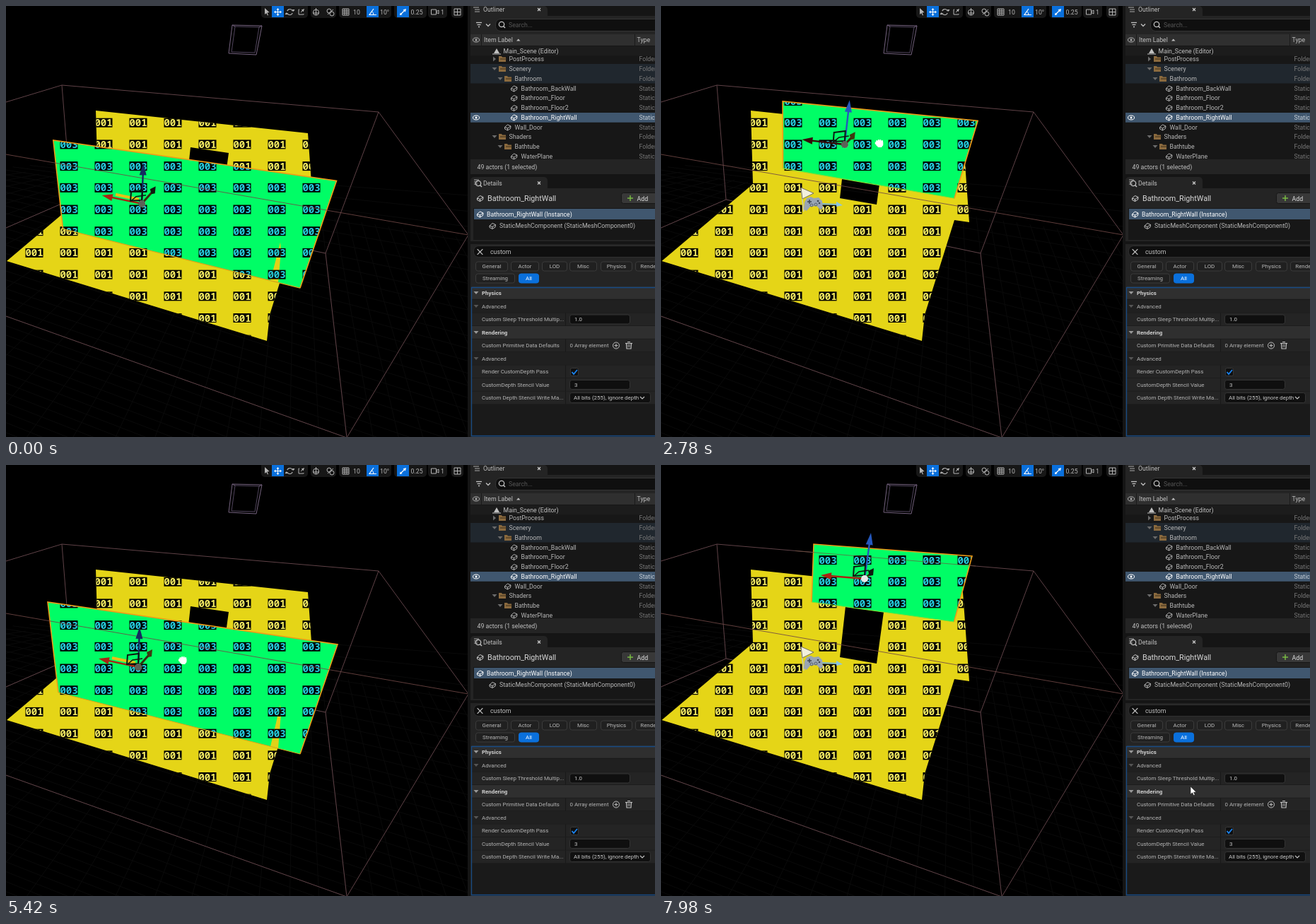
Recreate the animation shown at these times as an HTML page with a canvas. Size 918 by 610 pixels, loop 8000 ms.

```html
<!DOCTYPE html>
<html>
<head>
<meta charset="utf-8">
<style>
html, body { margin: 0; width: 100%; height: 100%; overflow: hidden; background: #000; }
canvas { display: block; }
</style>
</head>
<body>
<canvas id="stage" width="918" height="610"></canvas>
<script>
const g = document.getElementById('stage').getContext('2d');
const LOOP = 8000;

// [time, wall position along its drag axis]
const WALL = [[0, .05], [1460, .05], [1810, .178], [2230, .36], [2780, .72], [3060, .82], [3700, .99],
  [4300, .99], [4580, .809], [5070, .44], [5420, 0], [5560, -.01], [5760, -.01], [6150, .4],
  [6530, .8], [6740, .854], [7370, 1], [LOOP, 1]];
// [time, hand offset from the gizmo]
const HAND = [[1210, 22, -20], [1810, 23, -13], [2780, 49, -2], [4580, 55, -1], [5420, 63, -10], [6740, 60, 0], [7440, 62, 2]];
const ARROW_IN = [[70, 628, 468], [540, 201, 254], [800, 201, 254], [1000, 214, 255], [1210, 214, 255]];
const ARROW_OUT = [[7440, 350, 163], [7980, 749, 455], [LOOP, 749, 455]];

const mix = (a, b, k) => a + (b - a) * k;

function keyed(keys, t) {
  let i = 1;
  while (i < keys.length - 1 && keys[i][0] < t) i++;
  const a = keys[i - 1], b = keys[i];
  const k = Math.min(1, Math.max(0, (t - a[0]) / (b[0] - a[0])));
  return a.slice(1).map((v, j) => mix(v, b[j + 1], k));
}

function trace(pts, close = true) {
  pts.forEach(([x, y], i) => i ? g.lineTo(x, y) : g.moveTo(x, y));
  if (close) g.closePath();
}
function poly(pts, fill) {
  g.beginPath(); trace(pts); g.fillStyle = fill; g.fill();
}
function line(pts, color, w = 1, close = false) {
  g.beginPath(); trace(pts, close); g.strokeStyle = color; g.lineWidth = w; g.stroke();
}
function rect(x, y, w, h, fill, r = 0, border) {
  g.beginPath(); g.roundRect(x, y, w, h, r);
  g.fillStyle = fill; g.fill();
  if (border) { g.strokeStyle = border; g.lineWidth = 1; g.stroke(); }
}
function ring(x, y, r, color, w = 1, from = 0, to = 7) {
  g.beginPath(); g.arc(x, y, r, from, to); g.strokeStyle = color; g.lineWidth = w; g.stroke();
}
function dot(x, y, r, color) {
  g.beginPath(); g.arc(x, y, r, 0, 7); g.fillStyle = color; g.fill();
}
function text(s, x, y, color = '#c0c0c0', size = 8.75, weight = 400, font = 'Roboto, sans-serif') {
  g.font = `${weight} ${size}px ${font}`;
  g.fillStyle = color; g.textBaseline = 'alphabetic';
  g.fillText(s, x, y + size * .36);
}

// Fills the shapes and prints the stencil number over them on a screen grid
function stencil(shapes, fill, label, color) {
  g.save();
  g.beginPath(); shapes.forEach(s => trace(s));
  g.fillStyle = fill; g.fill('evenodd'); g.clip('evenodd');
  for (let r = 0; r < 12; r++) for (let c = 0; c < 9; c++) {
    const x = 40 + c * 49, y = 134.5 + r * 30.7;
    g.fillStyle = '#000'; g.fillRect(x - 12.5, y - 6.5, 25, 13);
    text(label, x - 12.6, y, color, 14, 700, '"Noto Sans Mono", monospace');
  }
  g.restore();
}

const ROOM = '#5f4247';
const FLOOR = [[127, 148], [427, 180], [436, 306], [415, 303], [373, 437], [369, 474], [1, 361], [130, 252]];
const DOOR = [[261, 200], [315, 208], [305, 281], [253, 272]];

function floorPoint(a, b) {
  return [mix(mix(92, 452, a), mix(-158, 482, a), b), mix(mix(274, 350, a), mix(383, 611, a), b)];
}

function backdrop() {
  for (let i = -6; i < 34; i++) {
    line([floorPoint(i / 16, -.2), floorPoint(i / 16, 2)], '#0a0a0a');
    line([floorPoint(-.5, i / 16), floorPoint(2, i / 16)], '#0a0a0a');
  }
  line([[0, 136], [79, 112], [92, 274], [0, 314]], ROOM);
  line([[92, 274], [452, 350], [482, 611], [0, 439]], ROOM);
  line([[527, 150], [452, 350]], ROOM);
  line([[79, 112], [527, 150], [654, 324], [482, 611]], ROOM);
  line([[320, 27], [362, 28], [354, 69], [315, 67]], '#75637f', 1, true);
  line([[324, 29], [358, 30], [352, 66], [319, 65]], '#51455d', 1, true);
  line([[320, 27], [324, 29]], '#75637f');
  line([[362, 28], [358, 30]], '#75637f');
}

function playerStart() {
  line([[198, 258], [202, 291]], '#c8c8c0', 1.5);
  poly([[198, 257], [216, 265], [200, 273]], '#f2f0dc');
  line([[198, 257], [216, 265], [200, 273]], '#77735a', 1, true);
  line([[228, 280], [250, 281]], '#7fb7d0', 2);
  poly([[248, 277], [257, 282], [248, 284]], '#8ec6de');
  poly([[206, 272], [212, 270], [216, 272], [223, 271], [228, 276], [229, 286], [225, 288], [220, 283],
    [211, 284], [206, 290], [202, 288], [203, 278]], '#9aa5b4');
  line([[207, 277], [213, 277]], '#3c4654', 1.5);
  line([[210, 274], [210, 280]], '#3c4654', 1.5);
  dot(222, 276, 1.3, '#3c4654'); dot(224, 279, 1.3, '#3c4654');
  ring(213, 282, 2, '#55606e'); ring(219, 281, 2, '#55606e');
}

function wall(u) {
  const bow = u * (1 - u);
  const tl = [mix(59, 216, u), mix(194, 112, u)];
  const tr = [mix(469, 440, u), mix(254, 129, u) - 8 * bow];
  const br = [mix(416, 414.5, u), mix(409, 222, u) - 10 * bow];
  const bl = [mix(74, 213, u) - 8 * bow, mix(322, 194, u)];
  const shape = [tl, tr, br, bl];
  stencil([shape], '#00fd66', '003', '#25cfe0');
  const edge = x => mix(bl[1], br[1], (x - bl[0]) / (br[0] - bl[0]));
  if (u < .5) {
    const top = br[1] / 2 + 135;
    const sliver = [[388, top], [389, top + 12], [385, edge(385)], [374, edge(374)]];
    stencil([sliver], '#e0d218', '003', '#25cfe0');
  }
  line([bl, tl, tr, br], '#ee9c18', 1.6);
  line([bl, br], u < .5 ? '#d9a817' : '#8ade30', 1.2);
}

function tip(x, y, dx, dy, len, w, color) {
  const d = Math.hypot(dx, dy), ux = dx / d, uy = dy / d;
  const bx = x - ux * len, by = y - uy * len;
  poly([[x, y], [bx - uy * w, by + ux * w], [bx + uy * w, by - ux * w]], color);
}

function gizmo(u, t) {
  const x = mix(187, 288, u), y = mix(286, 161, u);
  const drag = t > 1210 && t < 7440, far = drag && u > .5;
  const axis = (dx, dy, color, len, w) => {
    line([[x, y], [x + dx * .8, y + dy * .8]], color, 2.4);
    tip(x + dx, y + dy, dx, dy, len, w, color);
  };
  if (u < .5) line([[x - 37, y - 13], [x - 4, y - 6]], '#e8bf18', 4);
  axis(mix(-56, -62, u), mix(-12, -5, u), far ? '#360b0a' : '#a92413', 15, 5);
  axis(mix(2, 9, u), mix(-57, -65, u), u < .1 ? '#152b60' : u < .5 ? '#14285c' : '#2558bd', 17, 5);
  line([[x, y], [x + mix(15, 9, u), y + mix(-17, -8, u)]], '#342e10', 3);
  const ex = x + mix(16, 9, u), ey = y + mix(-19, -9, u);
  poly([[ex - 4, ey - 2], [ex + 4, ey - 6], [ex + 3, ey + 4], [ex - 2, ey + 5]], drag ? '#3e3a10' : '#10180f');
  line([[x - 15, y - 17], [x + 1, y - 19], [x, y - 5], [x - 16, y - 4]], '#0b1a12', 2, true);
  line([[x - 15, y - 4], [x - 8, y - 10], [x + 6, y - 12]], '#10180f', 1.6);
  dot(x, y, 5, t > 7440 ? '#e8e8e8' : '#454b42');
  for (let i = -4; i < 5; i += 2) for (let j = -4; j < 5; j += 2)
    if (i * i + j * j < 22 && t < 7440) { g.fillStyle = '#a0a498'; g.fillRect(x + i, y + j, 1, 1); }
  return [x, y];
}

function arrow([x, y]) {
  const pts = [[0, 0], [0, 11], [2.6, 8.8], [4.4, 12.6], [6.2, 11.8], [4.5, 8.2], [8, 8]].map(p => [x + p[0], y + p[1]]);
  poly(pts, '#fff'); line(pts, '#222', .6, true);
}

function hand(x, y) {
  rect(x - 4.5, y - 3, 10, 7.5, '#fff', 2.5);
  for (let i = 0; i < 4; i++) rect(x - 4.5 + i * 2.5, y - 5 + (i === 0 || i === 3), 2.2, 6, '#fff', 1);
  rect(x - 6, y - 2, 3.5, 4, '#fff', 1.5);
  rect(x - 2.5, y + 2, 6.5, 4, '#fff', 1.5);
}

function cursor(t, [x, y]) {
  if (t < 70) return;
  if (t < 1210) arrow(keyed(ARROW_IN, t));
  else if (t < 7440) { const [dx, dy] = keyed(HAND, t); hand(x + dx, y + dy); }
  else arrow(keyed(ARROW_OUT, t));
}

function toolbar() {
  const ink = '#b5b5b5';
  [[361, 66], [431, 36], [471, 74], [549, 46], [597, 27], [630, 17]].forEach(([x, w]) => rect(x, -6, w, 23, '#171717', 5));
  [376, 510, 553].forEach(x => rect(x, 0, 17, 16, '#0a70dc'));
  poly([[366, 3], [366, 12], [368.2, 10], [370, 13.5], [371, 13], [369.5, 9.5], [372.5, 9]], ink);
  line([[380, 8.5], [389, 8.5]], '#fff'); line([[384.5, 4], [384.5, 13]], '#fff');
  [[0, -1], [1, 0], [0, 1], [-1, 0]].forEach(([a, b]) => tip(384.5 + a * 5.5, 8.5 + b * 5.5, a, b, 2.5, 2, '#fff'));
  ring(401.5, 8.5, 4, ink, 1.2, .4, 2.8); ring(401.5, 8.5, 4, ink, 1.2, 3.5, 6);
  tip(406.5, 8, 0, 1, 3, 2, ink); tip(396.5, 9, 0, -1, 3, 2, ink);
  line([[415, 5], [414, 5], [414, 12], [421, 12], [421, 11]], ink);
  line([[417, 9], [421, 5]], ink); tip(422, 4, 1, -1, 4, 2, ink);
  ring(438.5, 9, 4, ink); line([[438.5, 3], [438.5, 13]], ink); line([[434, 10], [443, 10]], ink);
  ring(457, 7, 3, ink); ring(461, 11, 3, ink); line([[455, 12], [463, 5]], ink);
  for (let i = 0; i < 4; i++) {
    line([[476 + i * 3, 4], [476 + i * 3, 13]], ink);
    line([[476, 4 + i * 3], [485, 4 + i * 3]], ink);
  }
  text('10', 491, 8.5, ink);
  line([[520, 4], [514, 12.5], [524, 12.5]], '#fff', 1.2); ring(514, 12.5, 6, '#fff', 1, -1, 0);
  text('10°', 529, 8.5, ink);
  line([[558, 12], [564, 6]], '#fff', 1.2); tip(566, 4, 1, -1, 4, 2.4, '#fff'); tip(557, 13, -1, 1, 3, 2, '#fff');
  text('0.25', 572.5, 8.5, ink);
  line([[601.5, 5], [608.5, 5], [608.5, 12], [601.5, 12]], ink, 1, true);
  line([[608.5, 8], [612, 6], [612, 11], [608.5, 9]], ink);
  text('1', 615, 8.5, ink);
  line([[634, 4], [643, 4], [643, 13], [634, 13]], ink, 1, true);
  line([[638.5, 4], [638.5, 13]], ink); line([[634, 8.5], [643, 8.5]], ink);
}

function eye(x, y, color) {
  g.beginPath(); g.ellipse(x, y, 4.5, 3, 0, 0, 7); g.strokeStyle = color; g.lineWidth = 1; g.stroke();
  dot(x, y, 1.5, color);
}
function mesh(x, y, color = '#b8b8b8') {
  line([[x - 4, y], [x, y - 3.5], [x + 4.5, y - 1.5], [x + 4, y + 2], [x, y + 4.5], [x - 4, y + 2.5]], color, 1, true);
  line([[x - 4, y], [x, y + 1.5], [x + 4.5, y - 1.5]], color);
  line([[x, y + 1.5], [x, y + 4.5]], color);
}
function folder(x, y) {
  poly([[x - 5, y - 4], [x - 1, y - 4], [x, y - 2.5], [x + 5, y - 2.5], [x + 5, y + 4], [x - 5, y + 4]], '#8b6a3e');
  line([[x - 3, y], [x + 6, y]], '#3a2c18');
}
function fold(x, y, color = '#8a8a8a') { poly([[x - 3.5, y - 2], [x + 3.5, y - 2], [x, y + 2]], color); }
function lens(x, y) { ring(x, y, 3.7, '#c0c0c0', 1.3); line([[x + 2.5, y + 2.5], [x + 5, y + 5]], '#c0c0c0', 1.5); }
function cross(x, y, r, color = '#c8c8c8') {
  line([[x - r, y - r], [x + r, y + r]], color, 1.2); line([[x - r, y + r], [x + r, y - r]], color, 1.2);
}

// [y, indent, label, kind]
const TREE = [[75, 711, 'PostProcess', 'closed'], [89, 711, 'Scenery', 'open'], [103, 719, 'Bathroom', 'open'],
  [116.5, 728, 'Bathroom_BackWall'], [130, 728, 'Bathroom_Floor'], [144, 728, 'Bathroom_Floor2'],
  [157.5, 728, 'Bathroom_RightWall'], [171.5, 719, 'Wall_Door'], [185, 711, 'Shaders', 'open'],
  [199, 719, 'Bathtube', 'open'], [212.5, 728, 'WaterPlane']];

function outliner() {
  rect(657, 0, 261, 238, '#242424');
  rect(657, 0, 261, 14, '#151515'); rect(657, 0, 109, 14, '#242424', [0, 5, 0, 0]);
  line([[661, 2], [669, 2]], '#aaa'); line([[663, 5], [670, 5]], '#aaa'); line([[663, 8], [670, 8]], '#aaa');
  text('Outliner', 675, 5); cross(754, 5, 2);
  [[665, 673, 23.5], [666.5, 671.5, 26.5], [668, 670, 29.5]].forEach(([a, b, y]) => line([[a, y], [b, y]], '#c0c0c0', 1.3));
  line([[679, 25.5], [682, 28.5], [685, 25.5]], '#c0c0c0', 1.3);
  rect(692.5, 18.5, 232, 17, '#0f0f0f', 7, '#353535');
  lens(701, 26); text('Search...', 711, 26.5, '#555');
  rect(657, 40, 261, 16, '#2f2f2f');
  eye(665, 48, '#b0b0b0'); text('Item Label', 676, 48); poly([[722, 49.5], [727.5, 49.5], [724.7, 46.5]], '#c0c0c0');
  text('Type', 892.5, 48);
  line([[672.5, 40], [672.5, 56]], '#1a1a1a'); line([[889.5, 40], [889.5, 56]], '#1a1a1a');
  g.save();
  g.beginPath(); g.rect(657, 56, 261, 161); g.clip();
  rect(657, 56, 261, 161, '#171717');
  rect(657, 82, 261, 27.5, '#20272e');
  rect(657, 151, 261, 13.7, '#40576f');
  eye(665, 158, '#fff');
  TREE.forEach(([y, x, label, kind]) => {
    const on = y === 157.5;
    if (kind) {
      folder(x - 9, y);
      if (kind === 'open') fold(x - 20, y, '#6b6b6b');
      else poly([[x - 22, y - 3.5], [x - 18, y], [x - 22, y + 3.5]], '#6b6b6b');
    } else mesh(x - 9.5, y, on ? '#fff' : '#b0b0b0');
    text(label, x + .5, y, on ? '#fff' : '#b8b8b8');
    text(kind ? 'Folder' : 'StaticMesh', 895.5, y, on ? '#c8d0d8' : '#777');
  });
  rect(657, 57, 261, 13.5, '#1c1c1c');
  poly([[690, 67], [694, 60], [698, 67]], '#c0c0c0'); line([[688, 68], [700, 68]], '#c0c0c0');
  text('Main_Scene (Editor)', 703.5, 64);
  g.restore();
  text('49 actors (1 selected)', 666.5, 228);
}

function button(x, y, w, label, on) {
  rect(x + .5, y - 6.5, w - 1, 13, on ? '#0a70dc' : '#202020', 3, on ? '#0a70dc' : '#3b3b3b');
  g.textAlign = 'center'; text(label, x + w / 2, y, on ? '#fff' : '#b8b8b8', 7.9); g.textAlign = 'left';
}

// [y, label, is category]
const PROPS = [[406, 'Physics', 1], [425, 'Advanced', 2], [443.5, 'Custom Sleep Threshold Multip...'], [462, 'Rendering', 1],
  [480.5, 'Custom Primitive Data Defaults'], [499, 'Advanced', 2], [517.5, 'Render CustomDepth Pass'],
  [536, 'CustomDepth Stencil Value'], [554.5, 'Custom Depth Stencil Write Ma...']];

function details() {
  rect(657, 242, 261, 368, '#242424');
  rect(657, 238, 261, 20, '#151515'); rect(657, 242, 109, 16, '#242424', [5, 5, 0, 0]);
  line([[662, 246], [669, 246]], '#aaa'); line([[662, 249], [667, 249]], '#aaa'); line([[662, 252], [667, 252]], '#aaa');
  lens(668, 251);
  text('Details', 675, 250.5); cross(754, 250.5, 2);
  mesh(670.5, 272, '#d0d0d0'); text('Bathroom_RightWall', 681, 272, '#d8d8d8', 10.75);
  rect(870.5, 264.5, 60, 15, '#383838', 3, '#161616');
  line([[879, 272], [887, 272]], '#7cc144', 1.4); line([[883, 268], [883, 276]], '#7cc144', 1.4);
  text('Add', 892.5, 272.5, '#e0e0e0', 8.75);
  rect(661, 286, 257, 45, '#171717'); rect(662, 287, 256, 15, '#40576f');
  mesh(670.5, 294.5, '#fff'); text('Bathroom_RightWall (Instance)', 680, 294.5, '#fff');
  mesh(688, 311); text('StaticMeshComponent (StaticMeshComponent0)', 698, 311, '#b8b8b8');
  rect(657, 333, 261, 4, '#151515');
  rect(661.5, 339.5, 262, 16, '#0f0f0f', 7, '#303030');
  cross(670.5, 348, 3.8); text('custom', 685, 348);
  [[664, 368.5, 46, 'General'], [714, 368.5, 40, 'Actor'], [758, 368.5, 36, 'LOD'], [797, 368.5, 39, 'Misc'],
    [841, 368.5, 45, 'Physics'], [890, 368.5, 50, 'Rendering'], [664, 385.5, 56, 'Streaming']].forEach(b => button(...b));
  button(725, 385.5, 29, 'All', true);
  rect(658, 398, 260, 211, '#1a1a1a');
  PROPS.forEach(([y, label, kind]) => {
    rect(659, y - 9, 259, 17.7, kind === 1 ? '#2f2f2f' : kind ? '#202020' : '#242424');
    if (kind) fold(665, y, kind === 1 ? '#999' : '#555');
    else line([[791.5, y - 9], [791.5, y + 9]], '#181818');
    text(label, 673, y, kind === 1 ? '#d0d0d0' : '#b4b4b4', 7.9, kind === 1 ? 700 : 400);
  });
  [[443.5, '1.0'], [536, '3']].forEach(([y, v]) => {
    rect(797.5, y - 6.5, 85, 13, '#0f0f0f', 3, '#343434'); text(v, 804, y, '#c8c8c8', 7.9);
  });
  text('0 Array element', 797.5, 480.5, '#b4b4b4', 7.9);
  ring(863, 480.5, 4.5, '#c0c0c0'); line([[860.5, 480.5], [865.5, 480.5]], '#c0c0c0'); line([[863, 478], [863, 483]], '#c0c0c0');
  line([[877.5, 478], [878, 485], [884, 485], [884.5, 478]], '#c0c0c0', 1.2);
  line([[876, 477.5], [886, 477.5]], '#c0c0c0', 1.2); line([[879, 475.5], [883, 475.5]], '#c0c0c0');
  line([[880, 479], [880, 483]], '#c0c0c0', .8); line([[882, 479], [882, 483]], '#c0c0c0', .8);
  rect(798.5, 512.5, 11, 11, '#0f0f0f', 2, '#383838');
  line([[800.5, 518], [803, 521], [808, 515]], '#1a83ef', 1.8);
  rect(797.5, 547.5, 114, 14, '#101010', 3, '#343434');
  text('All bits (255), ignore depth', 803, 554.5, '#c8c8c8', 7.9);
  line([[897, 553], [900, 556], [903, 553]], '#c0c0c0', 1.2);
  line([[920, 398.5], [658.5, 398.5], [658.5, 608.5], [920, 608.5]], '#174a83', 1.3);
}

function draw(now) {
  const t = now % LOOP, [u] = keyed(WALL, t);
  g.fillStyle = '#000'; g.fillRect(0, 0, 918, 610);
  backdrop();
  stencil([FLOOR, DOOR], '#e5d517', '001', '#f5ec62');
  playerStart();
  wall(u);
  line([[0, 210], [654, 324]], 'rgba(112,72,70,.85)');
  if (u > .8) line([[190, 121.5], [445, 143]], 'rgba(112,80,62,.7)');
  const origin = gizmo(u, t);
  toolbar();
  rect(653, 0, 265, 610, '#151515');
  outliner();
  details();
  cursor(t, origin);
  requestAnimationFrame(() => draw(performance.now()));
}
draw(0);
</script>
</body>
</html>
```
